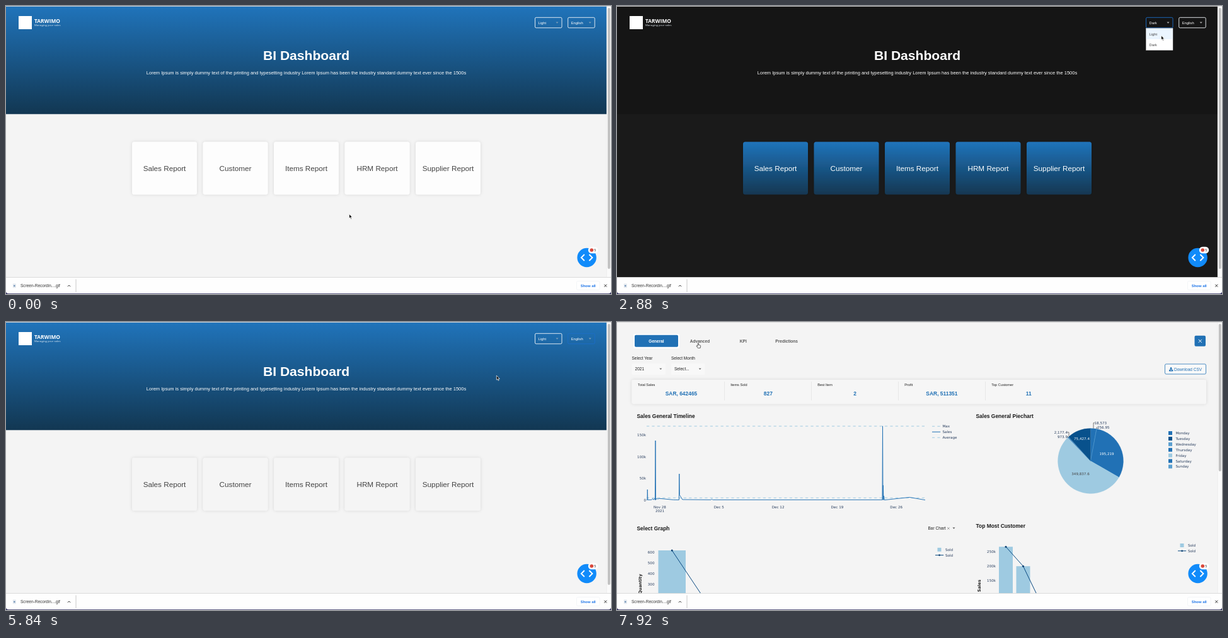
These frames come from a looping animation (960x459 px, 8000 ms). An HTML page:

```html
<!DOCTYPE html>
<html lang="en">
<head>
<meta charset="utf-8">
<title>BI Dashboard</title>
<style>
html, body { margin: 0; width: 100%; height: 100%; overflow: hidden; background: #f4f4f4; }
svg { display: block; width: 100vw; height: 100vh; }
text { font-family: "Liberation Sans", Arial, sans-serif; }
.plot { font-family: "DejaVu Sans", Verdana, sans-serif; }
.brand { font-family: "Open Sans", sans-serif; }
.b { font-weight: 700; }
.m { text-anchor: middle; }
.e { text-anchor: end; }
</style>
</head>
<body>
<svg viewBox="0 0 960 459" preserveAspectRatio="none">
  <defs>
    <linearGradient id="blue" x1="0" y1="0" x2="0" y2="1">
      <stop offset="0" stop-color="#2074bb"/><stop offset="1" stop-color="#123752"/>
    </linearGradient>
    <filter id="soft" x="-20%" y="-20%" width="140%" height="140%">
      <feDropShadow dx="0" dy="0" stdDeviation="2.4" flood-color="#000" flood-opacity=".13"/>
    </filter>
    <clipPath id="view"><rect width="953" height="432.5"/></clipPath>
  </defs>
  <g id="page" clip-path="url(#view)"></g>
  <g id="chrome"></g>
  <g id="pointer"></g>
</svg>
<script>
const LOOP = 8000, STEP = 80;
const BLUE = '#2171b5', NAVY = '#08518c', SKY = '#9ecae1', MID = '#5a9fd0';

const T = {
  menu1: [1120, 1520], menu2: [2480, 2960],
  lang1: [3840, 4560], lang2: [5280, 5600],
  blur: 5920, hover: 6160, status: 6320,
  report: 6640, timeline: 6800, charts: 7200, hand: 7600
};

// Pointer path: time, x, y
const PATH = [
  [0, 544.5, 331.5], [80, 544.5, 331.5], [320, 770, 265], [640, 770, 265],
  [1040, 862, 27], [1200, 862, 27], [1440, 856.5, 59.5], [1840, 856.5, 59.5],
  [2400, 862, 27], [2560, 862, 27], [2880, 863.5, 47], [3280, 863.5, 47],
  [3760, 908, 27], [3920, 908, 27], [4400, 906, 59.5], [4880, 906, 59.5],
  [5200, 908, 27], [5360, 908, 27], [5520, 908, 46], [5680, 908, 46],
  [6240, 254, 244], [6640, 254, 244], [6800, 253.5, 224], [7040, 253.5, 224],
  [7680, 129, 33.5], [8000, 129, 33.5]
];

const TEXT = {
  en: {
    title: 'BI Dashboard',
    sub: 'Lorem Ipsum is simply dummy text of the printing and typesetting industry Lorem Ipsum has been the industry standard dummy text ever since the 1500s',
    cards: ['Sales Report', 'Customer', 'Items Report', 'HRM Report', 'Supplier Report'],
    sizes: [21.1, 7.5, 11.72], rows: [86, 109, 263]
  },
  ar: {
    title: 'لوحة معلومات الأعمال',
    sub: 'لوريم إيبسوم هو ببساطة نص شكلي في صناعة الطباعة والتنضيد ، كان لوريم إيبسوم هو النص الوهمي القياسي في الصناعة منذ القرن الخامس عشر الميلادي',
    cards: ['تقرير المبيعات', 'تقرير العملاء', 'تقرير العنصر', 'تقرير الموظفين', 'تقرير الموردين'],
    sizes: [17, 7.2, 9.8], rows: [82, 108, 261]
  }
};

const text = (x, y, s, size, fill = '#222', cls = '') =>
  `<text x="${x}" y="${y}" font-size="${size}" fill="${fill}" class="${cls}">${s}</text>`;
const rect = (x, y, w, h, fill, more = '') =>
  `<rect x="${x}" y="${y}" width="${w}" height="${h}" fill="${fill}" ${more}/>`;
const path = (d, stroke, w = 1, more = '') =>
  `<path d="${d}" fill="none" stroke="${stroke}" stroke-width="${w}" ${more}/>`;
const caret = (x, y, fill) => `<path d="M${x - 2} ${y - 1}h4l-2 2.2z" fill="${fill}"/>`;
const tick = (x, y, s, cls = 'e') => text(x, y, s, 5.6, '#2a3f5f', 'plot ' + cls);
const list = (items, fn) => items.map(fn).join('');
const within = (t, [a, b]) => t >= a && t < b;

function pointerAt(t) {
  let i = 1;
  while (PATH[i][0] < t) i++;
  const [t0, x0, y0] = PATH[i - 1], [t1, x1, y1] = PATH[i];
  const p = (t - t0) / (t1 - t0), k = p * p * (3 - 2 * p);
  return [x0 + (x1 - x0) * k, y0 + (y1 - y0) * k];
}

function select(x, value, focused, dim) {
  return rect(x, 18.3, 42.5, 16.5, 'none', `rx="1.8" stroke="${focused ? '#1c6fca' : '#f2f6fa'}" stroke-width=".9"`) +
    text(x + 5, 28.6, value, 5.8, '#fff') + caret(x + 35, 26.6, dim);
}

function menu(x, options, y) {
  return rect(x, 35.5, 42.5, 35, '#fff', 'stroke="#ccc" stroke-width=".5"') +
    rect(x + .3, y < 53 ? 36 : 53, 42, 17, '#ebf5ff') +
    list(options, (s, i) => text(x + 5, 46.6 + i * 17, s, 5.8, '#444'));
}

function home(t) {
  const dark = within(t, [T.menu1[1], T.menu2[1]]);
  const arabic = within(t, [T.lang1[1], T.lang2[1]]);
  const L = arabic ? TEXT.ar : TEXT.en;
  const [s1, s2, s3] = L.sizes, [y1, y2, y3] = L.rows;
  const family = arabic ? 'plot m' : 'm';
  const grow = Math.max(0, Math.min(1, (t - T.hover) / 160));
  const plain = t < T.menu1[1] ? '#fdfdfd' : '#f5f5f5';
  const dim = dark ? '#b5b5b5' : '#7f9fb8';
  const y = pointerAt(t)[1];

  let out = rect(0, 0, 953, 433, dark ? '#1a1a1a' : '#f4f4f4') +
    rect(0, 0, 953, 172.3, dark ? '#151515' : 'url(#blue)') +
    rect(20, 16, 21, 21, '#fff') +
    text(45, 27, 'TARWIMO', 8.4, '#fff', 'brand b') +
    text(45, 32.3, 'Managing your sales', 4.35, '#e6eef5', 'brand') +
    select(839.5, dark ? 'Dark' : 'Light', within(t, [T.menu1[0], T.lang1[0] - 80]), dim) +
    select(891.7, arabic ? 'Arabic' : 'English', within(t, [T.lang1[0], T.blur]), dim) +
    text(476.5, y1, L.title, s1, '#fff', family + ' b') +
    text(476.5, y2, L.sub, s2, '#fff', family);

  out += list(L.cards, (s, i) => {
    const x = 200 + i * 112.5, hot = i === 0 && grow > 0;
    const cut = hot ? 12.5 * grow : 0;
    const fill = dark || hot ? 'url(#blue)' : plain;
    return rect(x, 216.5 + cut, 103, 84 - 2 * cut, fill, 'rx="3.5" filter="url(#soft)"') +
      text(x + 51.5, y3, s, s3, dark || hot ? '#fff' : '#444', family);
  });

  if (within(t, T.menu1) || within(t, T.menu2)) out += menu(839.5, ['Light', 'Dark'], y);
  if (within(t, T.lang1) || within(t, T.lang2)) out += menu(891.7, ['English', 'Arabic'], y);
  return out;
}

function controls() {
  const tabs = [['General', 62.5], ['Advanced', 131.5], ['KPI', 200.3], ['Predictions', 269.2]];
  const stats = [['Total Sales', 'SAR, 642465'], ['Items Sold', '827'], ['Best Item', '2'],
    ['Profit', 'SAR, 511351'], ['Top Customer', '11']];
  return rect(26, 19, 73, 23, '#fff', 'rx="2"') +
    rect(28, 20.8, 69, 19, BLUE, 'rx="2"') +
    list(tabs, ([s, x], i) => text(x, 32.6, s, 6.56, i ? '#5a5a5a' : '#fff', 'b m')) +
    rect(916.5, 21.7, 17.5, 17, BLUE, 'rx="2"') +
    path('M922.8 27.8l5 5m0-5l-5 5', '#fff', 1) +
    text(23.5, 60.2, 'Select Year', 6.5) + text(86, 60.2, 'Select Month', 6.5) +
    rect(23.5, 66, 53.5, 18, '#f8f8f8', 'rx="2"') + rect(86, 66, 53.5, 18, '#f8f8f8', 'rx="2"') +
    text(28.5, 77.4, '2021', 6.56) + text(91, 77.4, 'Select...', 6.56) +
    caret(69.3, 74.8, '#666') + caret(131.7, 74.8, '#666') +
    rect(869.5, 67, 65, 16, '#f9f9f9', `rx="2" stroke="${BLUE}" stroke-width=".8"`) +
    `<path d="M878.2 72h1.8v2.4h1.7l-2.6 2.4-2.6-2.4h1.7zM876 76h1.2l2 1.4 1.9-1.4h1.2v2.4H876z" fill="${BLUE}"/>` +
    text(884, 77.5, 'Download CSV', 6.5, BLUE) +
    rect(23.5, 92, 911.5, 38.5, '#f6f6f6', 'rx="3" filter="url(#soft)"') +
    list(stats, ([label, value], i) => {
      const x = 33 + i * 138 + (i ? 9.5 : 0);
      return text(i ? x - .3 : x, 101.8, label, 5.6, '#222') +
        text(102 + i * 137.8, 117.2, value, 8.44, BLUE, 'b m') +
        (i ? path(`M${32.5 + i * 138} 95v30`, '#e2e2e2', .7) : '');
    });
}

function timeline() {
  const dash = 'stroke-dasharray="4.2 4.2"';
  const sales = 'M47 283.5h1l.3-16.5.5 16.5 6-.2 2-1.8 1.2 1.8 2-2.3.4 2.5.6-94.5.5 94.5 1.8-2.5 1.5 1.2 2-1 23 2.2 8.6.1.4-41.5.5 33.5 4.5 7.5 45 .4 1.6-1 1.8 1H421l.5-117.5.5 117.5.4-23 .5 23.2.6-6.5.7 6.6 18-2 22-2.3 24.8 4.3';
  return path('M47 166H490M47 280.3H490', SKY, 1, dash) +
    path(sales, BLUE, .95, 'stroke-linejoin="round"') +
    list(['150k', '100k', '50k', '0'], (s, i) => tick(46, 182 + i * 34.6, s)) +
    list(['Nov 28', 'Dec 5', 'Dec 12', 'Dec 19', 'Dec 26'], (s, i) => tick(68 + i * 93.8, 296.5, s, 'm')) +
    tick(68, 303.4, '2021', 'm') +
    list(['Max', 'Sales', 'Average'], (s, i) =>
      path(`M500 ${166.2 + i * 9}h13.2`, i === 1 ? BLUE : SKY, 1, i === 1 ? '' : dash) +
      tick(516.5, 168.3 + i * 9, s, ''));
}

function modebar() {
  const g = '#8c96a3';
  return rect(440, 158, 101, 10, '#f4f4f4', 'opacity=".8"') +
    rect(442, 161, 7.5, 5, g, 'rx="1"') + `<circle cx="445.7" cy="163.5" r="1.5" fill="#f4f4f4"/>` +
    `<circle cx="460" cy="162.4" r="2.4" fill="none" stroke="#444e5b" stroke-width="1.2"/>` +
    path('M461.8 164.2l2.4 2.4', '#444e5b', 1.4) +
    path('M468.5 163.2h7m-3.5-3.5v7', g, 1) +
    list([487, 498], (x, i) => rect(x - 3.4, 159.8, 6.8, 6.8, g) +
      path(`M${x - 2} 163.2h4` + (i ? '' : `M${x} 161.2v4`), '#f4f4f4', 1)) +
    path('M506 160l6.5 6.5m0-6.5l-6.5 6.5', g, .9) +
    `<path d="M516.5 163.3l4-3.7 4 3.7h-1v3.5h-6v-3.5z" fill="${g}"/>` +
    rect(531.5, 159, 8, 8, '#2a4f7d');
}

function emptyAxes() {
  const grey = '#777';
  return list([4, 3, 2, 1, 0, '−1'], (s, i) => tick(606, 203.8 + i * 25.2, s)) +
    path('M647 202V328M607 302.5H889', grey, .8) +
    list([0, 1, 2, 3, 4, 5, 6], i => path(`M${646 + i * 40.2} 330.6h1.6`, '#aaa', .6)) +
    list([4, 3, 2], (s, i) => tick(606, 379 + i * 25.2, s)) + path('M647 377V433', grey, .8) +
    list([4, 3], (s, i) => tick(68.5, 386 + i * 25.2, s)) + path('M131 384V433', grey, .8);
}

function pie() {
  const cx = 751.5, cy = 221.5, r = 52;
  const parts = [[18573, BLUE], [256.95, MID], [195219, BLUE], [349837.6, SKY],
    [2177.4, BLUE], [973.9, MID], [75427.4, NAVY]];
  const total = parts.reduce((s, p) => s + p[0], 0);
  const at = v => {
    const a = v / total * 2 * Math.PI;
    return `${(cx + r * Math.sin(a)).toFixed(2)} ${(cy - r * Math.cos(a)).toFixed(2)}`;
  };
  let sum = 0;
  const slices = list(parts, ([v, c]) => {
    const from = at(sum);
    sum += v;
    return `<path d="M${cx} ${cy}L${from}A${r} ${r} 0 ${+(v > total / 2)} 1 ${at(sum)}z" fill="${c}" stroke="${c}" stroke-width=".2"/>`;
  });
  const days = ['Monday', 'Tuesday', 'Wednesday', 'Thursday', 'Friday', 'Saturday', 'Sunday'];
  const tones = [BLUE, NAVY, MID, BLUE, SKY, BLUE, MID];
  return slices + path(`M${cx} ${cy}L${at(18700)}`, '#4a94cc', .7) +
    path('M756 169.7V160.8h2M761 170.3v-2.2h1.5M717 182v-6.2h-2.5M716.3 183.2h-2', '#444', .7) +
    tick(757.5, 163, '18,573', '') + tick(762, 169.8, '256.95', '') +
    tick(715, 178.3, '2,177.4') + tick(715, 185, '973.9') +
    text(777, 212, '195,219', 5.6, '#fff', 'plot m') +
    text(735.5, 244.3, '349,837.6', 5.6, '#444', 'plot m') +
    text(737.5, 188.2, '75,427.4', 5.6, '#fff', 'plot m') +
    list(days, (s, i) => rect(875, 174 + i * 8.9, 6, 6, tones[i]) + tick(886.5, 179 + i * 8.9, s, ''));
}

function bars(ticks, tx, ty, dy, name, nx, ny, tops, w, lx, ly, tail) {
  const line = list(tops, ([x, y], i) => (i ? 'L' : 'M') + `${x + w / 2} ${y}`) + tail;
  return list(ticks, (s, i) => tick(tx, ty + i * dy, s)) +
    `<text class="plot b m" font-size="6.5" fill="#222" transform="translate(${nx} ${ny}) rotate(-90)">${name}</text>` +
    list(tops, ([x, y]) => rect(x, y, w, 440 - y, SKY)) +
    path(line, '#0b4a82', 1) +
    list(tops, ([x, y]) => `<circle cx="${x + w / 2}" cy="${y}" r="1.5" fill="#0b3f70"/>`) +
    rect(lx + 3.5, ly - 3, 6, 6, SKY) + tick(lx + 16, ly + 2, 'Sold', '') +
    path(`M${lx} ${ly + 8.8}h13.2`, '#0b4a82', 1) +
    `<circle cx="${lx + 6.6}" cy="${ly + 8.8}" r="1.4" fill="#0b3f70"/>` +
    tick(lx + 16, ly + 10.8, 'Sold', '');
}

function report(t) {
  const ready = t >= T.charts, [x, y] = pointerAt(t);
  let out = rect(0, 0, 953, 433, '#f4f4f4') + controls() +
    text(31.5, 152.8, 'Sales General Timeline', 8.44, '#1a1a1a', 'b') +
    text(569.5, 152.8, 'Sales General Piechart', 8.44, '#1a1a1a', 'b') +
    text(31.5, 331.7, 'Select Graph', 8.44, '#1a1a1a', 'b') +
    text(493.5, 331, 'Bar Chart', 6.56) +
    path('M524.2 327.2l3.4 3.4m0-3.4l-3.4 3.4', '#777', .7) + caret(534.5, 328.6, '#555');
  if (t >= T.timeline) out += timeline();
  if (t >= T.timeline && y > 157 && x > 31) out += modebar();
  if (!ready) return out + emptyAxes();
  return out + pie() +
    text(569.5, 328.3, 'Top Most Customer', 8.44, '#1a1a1a', 'b') +
    bars([600, 500, 400, 300], 59.5, 368.8, 17.1, 'Quantity', 39, 417.5,
      [[65.5, 364]], 43.5, 505, 362.8, 'L133 433') +
    bars(['250k', '200k', '150k'], 601, 368, 22.8, 'Sales', 576.5, 420.5,
      [[606, 358.2], [633.5, 389.2]], 22, 890, 356, 'L666 434');
}

function chrome(t) {
  const end = t < T.report ? 419 : t < T.charts ? 292 : 238;
  const status = within(t, [T.status, T.report])
    ? rect(0, 422.5, 89, 10, '#e1dae9') + text(2, 429.7, 'localhost:8050/sales/salesPage', 6, '#8d8398') : '';
  return rect(0, 0, 960, .9, '#dcdcdc') +
    rect(953, 1, 7, 432, '#fafafa') + path('M953.2 1V432', '#e4e4e4', .5) +
    rect(954.8, 3, 4, end - 3, '#c1c1c1', 'rx="2"') +
    `<circle cx="921.6" cy="401" r="15.2" fill="#118bfa"/>` +
    path('M917.8 396l-5 5 5 5M925.4 396l5 5-5 5', '#fff', 1.9) +
    rect(923.8, 383.8, 15.4, 10.4, '#fff', 'rx="5.2"') +
    `<circle cx="929.3" cy="389" r="2.8" fill="#d9473a"/>` +
    text(933.3, 391, '5', 5.4, '#333') + status +
    rect(0, 432.3, 960, 27, '#fefefe') + path('M0 432.5H960', '#d4d4d4', .8) +
    rect(10.8, 442.6, 5, 6.6, '#e3e8ee', 'rx=".6"') + `<circle cx="13.3" cy="446" r="1.3" fill="#6d8fb5"/>` +
    text(23, 448.2, 'Screen-Recordin....gif', 6.5, '#333') +
    path('M97.8 447.2l2.2-2.2 2.2 2.2', '#444', 1) +
    path('M111 435.5V456', '#bdbdbd', .8) +
    rect(905.5, 438.5, 36.5, 14, '#fff', 'rx="2" stroke="#eef1f5" stroke-width=".7"') +
    text(923.8, 447.8, 'Show all', 5.9, '#1a73e8', 'b m') +
    path('M949.3 443.7l4 4m0-4l-4 4', '#333', 1) +
    `<path d="M0 455q.3 3.3 4 3.3H956q3.7 0 4-3.3v4H0z" fill="#2c2a5c"/>`;
}

function pointer(t) {
  const [x, y] = pointerAt(t);
  const inReport = t >= T.report;
  let shape;
  if (inReport && t < T.hand && y > 165 && x > 47) {
    shape = path('M-3 0h6M0-3v6', '#444', .8);
  } else if (within(t, [T.hover, T.report]) || t >= T.hand) {
    shape = '<path d="M-.9.6Q-.2-.4.5.6V3l2.4.6q.9.3.8 1.3L3.1 7.9H-.8L-2.8 5q-.2-1 .8-.8l1.1.8z" fill="#fff" stroke="#222" stroke-width=".7" stroke-linejoin="round"/>';
  } else {
    shape = '<path d="M0 0V7L1.6 5.6 2.7 8.2 3.9 7.7 2.8 5.2H5z" fill="#111" stroke="#fff" stroke-width=".7" stroke-linejoin="round"/>';
  }
  return `<g transform="translate(${x.toFixed(2)} ${y.toFixed(2)})">${shape}</g>`;
}

const layers = { page: t => t < T.report ? home(t) : report(t), chrome, pointer };
const shown = {};

function draw(t) {
  for (const id in layers) {
    const html = layers[id](t);
    if (html !== shown[id]) document.getElementById(id).innerHTML = shown[id] = html;
  }
}

const start = performance.now();
function frame() {
  const t = (performance.now() - start) % LOOP;
  draw(Math.floor(t / STEP) * STEP);
  requestAnimationFrame(frame);
}
frame();
</script>
</body>
</html>
```
